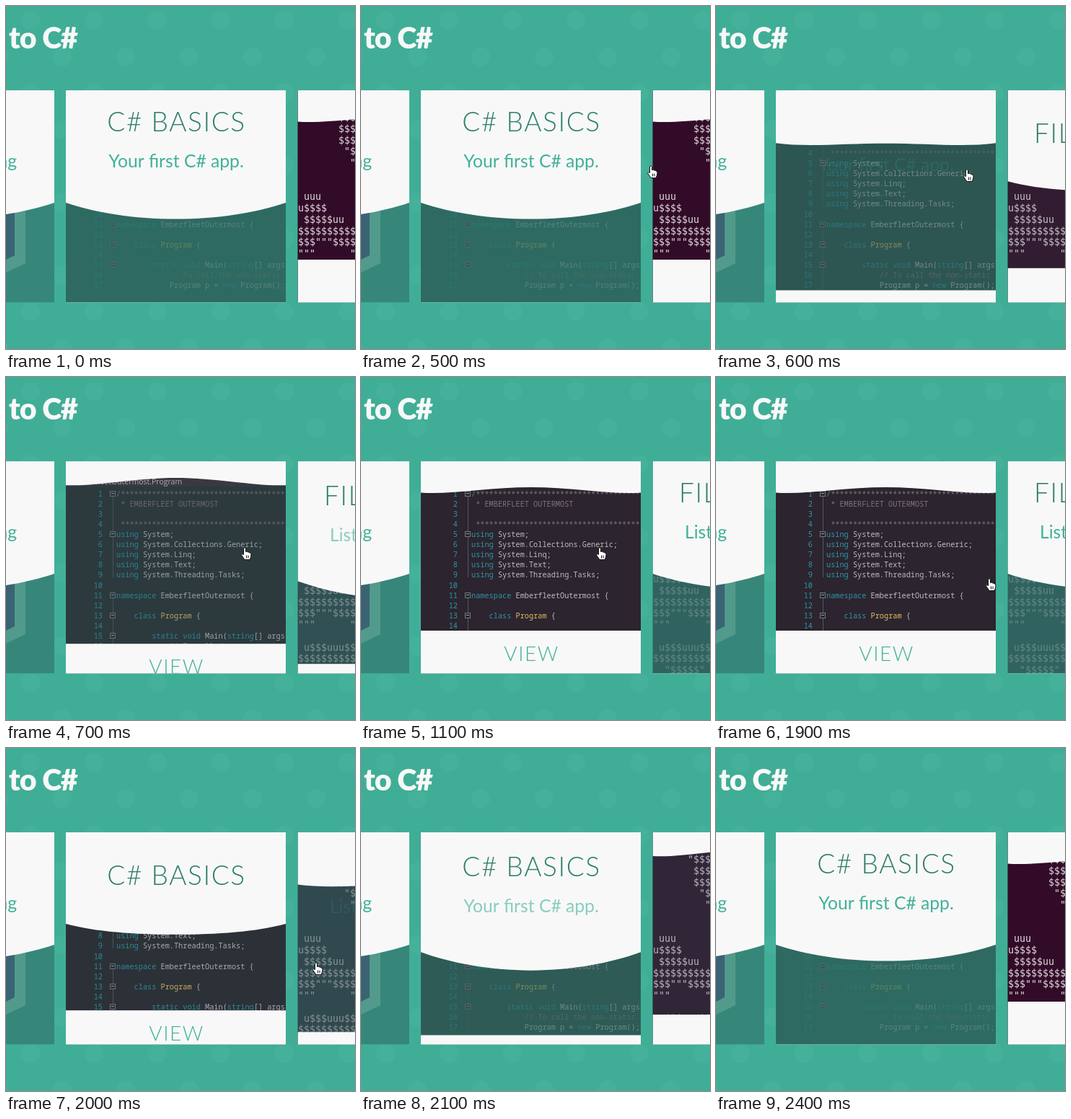
Animation of 484 by 476 pixels, one loop 2.5 s. Source, as an HTML page with a canvas:

```html
<!DOCTYPE html>
<html>
<head>
<meta charset="utf-8">
<style>
html, body { margin: 0; width: 100%; height: 100%; overflow: hidden; background: #40ae96; }
canvas { display: block; }
</style>
</head>
<body>
<canvas id="stage" width="484" height="476"></canvas>
<script>
const ctx = document.getElementById('stage').getContext('2d');
const LOOP = 2500, ENTER = 530, LEAVE = 1929;
const TOP = 117, W = 305, H = 294.5;
const WHITE = '#f8f8f8', TEAL = '#42b199', DEEP = '#2e7d6b', TINT = '#2f8a77';
const LATO = 'Lato, sans-serif';

const clamp = v => Math.max(0, Math.min(1, v));
const mix = (a, b, k) => a + (b - a) * k;
const smooth = k => k * k * (3 - 2 * k);
const backOut = k => { const m = k - 1; return m * m * (2.70158 * m + 1.70158) + 1; };

function text(str, x, y, font, color, align = 'left', spacing = 0) {
  ctx.font = font;
  ctx.fillStyle = color;
  ctx.textAlign = align;
  ctx.letterSpacing = spacing + 'px';
  ctx.fillText(str, x, y);
}

function rect(x, y, w, h, color) {
  ctx.fillStyle = color;
  ctx.fillRect(x, y, w, h);
}

function poly(points, color) {
  ctx.beginPath();
  points.forEach(p => ctx.lineTo(...p));
  ctx.fillStyle = color;
  ctx.fill();
}

function withAlpha(alpha, draw) {
  ctx.save();
  ctx.globalAlpha = alpha;
  draw();
  ctx.restore();
}

function clipCard(x) {
  ctx.beginPath();
  ctx.rect(x, TOP, W, H);
  ctx.clip();
}

function background() {
  rect(0, 0, 484, 476, '#40ae96');
  ctx.fillStyle = '#45b19a';
  for (let row = 0; row < 10; row++)
    for (let col = -1; col < 6; col++) {
      ctx.beginPath();
      ctx.arc(34 + 88 * col + 44 * (row % 2), 20 + 50.5 * row, 13, 0, 7);
      ctx.fill();
    }
  text('to C#', 4, 59, '900 41px ' + LATO, WHITE, 'left', -.9);
}

// Code lines: segments of [colour key, text]
const INK = { k: '#2b97a8', t: '#bdbdc2', c: '#7d747e', y: '#e0bf62' };
const CODE = [
  [['c', '/' + '*'.repeat(45)]],
  [['c', ' * EMBERFLEET OUTERMOST']],
  [],
  [['c', ' ' + '*'.repeat(45)]],
  ...['System', 'System.Collections.Generic', 'System.Linq', 'System.Text', 'System.Threading.Tasks']
    .map(name => [['k', 'using '], ['t', name + ';']]),
  [],
  [['k', 'namespace '], ['t', 'EmberfleetOutermost {']],
  [],
  [['k', '    class '], ['y', 'Program'], ['t', ' {']],
  [],
  [['k', '        static void '], ['t', 'Main('], ['k', 'string'], ['t', '[] args) {']],
  [['c', '            // To call the non-static']],
  [['t', '            Program p = '], ['k', 'new '], ['t', 'Program();']],
];

function editor() {
  const font = '10.25px "Noto Sans Mono", monospace';
  rect(83, TOP, W, H, '#2c242e');
  rect(83, TOP, W, 35, '#3c3a43');
  text('EmberfleetOutermost.Program', 92, 149, '10.5px "Open Sans", sans-serif', '#cfcfd2');
  rect(148, 162, 1, 116, '#4e5a60');
  rect(148, 303, 1, 110, '#4e5a60');
  CODE.forEach((line, i) => {
    const y = 162 + 14.06 * i;
    text(i + 1, 134, y + 4, font, INK.k, 'right');
    let col = 0;
    for (const [ink, part] of line) {
      text(part, 153 + col * 6.153, y + 4, font, INK[ink]);
      col += part.length;
    }
    if ([0, 4, 10, 12, 14].includes(i)) {
      const top = Math.round(y) - 4;
      rect(144, top, 8, 8, '#6c7d82');
      rect(145, top + 1, 6, 6, '#2c242e');
      rect(146, top + 3, 4, 1, '#9aa6aa');
    }
  });
}

const ASCII = [
  '      "$$$$', '       $$$$', '       $$$$', '        "$$', '         "$', '', '',
  ' uuu', 'u$$$$', ' $$$$$uu', '$$$$$$$$$$$', '$$$"""$$$$$', '"""      "$', '',
  ' u$$$uuu$$$', '$$$$$$$$$$$', '  "$$$$$"',
];

function terminal() {
  rect(404, TOP, W, H, '#320b28');
  ASCII.forEach((line, i) =>
    text(line, 405, 159.3 + 15.73 * i, '13.3px "DejaVu Sans Mono", monospace', '#e2dde0'));
}

// White panel whose lower edge morphs from a bulge to a ripple
function wave(x, k) {
  const sx = W / 180, sy = .911;
  const px = v => x + v * sx, py = v => TOP + v * sy;
  const edge = mix(171.14, 47.78, k);
  const near = edge + mix(15.47, 3.13, k);
  const mid = edge + mix(24.76, -8.2, k);
  ctx.beginPath();
  ctx.moveTo(x, TOP);
  ctx.lineTo(x, py(edge));
  ctx.bezierCurveTo(px(24.58), py(near), px(55.9), py(mid), px(90), py(mid));
  ctx.bezierCurveTo(px(124.1), py(mid), px(155.42), py(near), px(180), py(edge));
  ctx.lineTo(px(180), TOP);
  ctx.fillStyle = WHITE;
  ctx.fill();
}

function card(x, hover, since, picture, labels) {
  const turn = k => hover ? k : 1 - k;
  const step = clamp(since / 245);
  const slide = turn(hover ? step : smooth(step));
  const bottom = mix(TOP + H, 352, slide);
  ctx.save();
  clipCard(x);
  rect(x, TOP, W, H, TINT);
  withAlpha(mix(.3, 1, slide), picture);
  wave(x, turn(backOut(clamp(since / 330))));
  rect(x, bottom, W, 70, WHITE);
  text('VIEW', x + W / 2 + 1, bottom + 42, '300 28px ' + LATO, TEAL, 'center', 1.5);
  const titleAlpha = 1 - turn(clamp(since / 60));
  const noteAlpha = hover ? clamp(1 - since / 84) : clamp((since - 80) / 150);
  ctx.translate(0, 20 * slide);
  labels(titleAlpha, noteAlpha);
  ctx.restore();
}

const title = (str, x, align) => text(str, x, 174, '300 37px ' + LATO, DEEP, align, 1.6);
const note = (str, x, align) => text(str, x, 223.5, '24.7px ' + LATO, TEAL, align);

function basicsLabels(a, b) {
  withAlpha(a, () => title('C# BASICS', 236.5, 'center'));
  withAlpha(b, () => note('Your first C# app.', 236, 'center'));
}

function filesLabels(a, b) {
  withAlpha(a, () => title('FILES', 441));
  withAlpha(b, () => note('Listing them.', 449));
}

function shieldCard() {
  const x = -238;
  ctx.save();
  clipCard(x);
  rect(x, TOP, W, H, '#36877a');
  poly([[0, 270], [27, 270], [27, 357], [0, 370]], '#529a8b');
  poly([[0, 270], [12, 270], [12, 346], [0, 352]], '#3a6473');
  wave(x, 0);
  note('Getting going', 15, 'right');
  ctx.restore();
}

// Fingertip path: time, x, y
const PATH = [
  [400, 470, 232], [500, 402, 222], [600, 348, 227], [700, 331, 237], [1100, 331, 237],
  [1500, 367, 271], [1700, 379, 280], [1900, 379, 280], [2000, 430, 298],
];

function cursor(t) {
  const i = PATH.findIndex(p => p[0] >= t);
  if (i < 0 || t < PATH[0][0]) return;
  const b = PATH[i], a = PATH[Math.max(0, i - 1)];
  const k = i ? (t - a[0]) / (b[0] - a[0]) : 0;
  ctx.save();
  ctx.translate(mix(a[1], b[1], k), mix(a[2], b[2], k));
  ctx.beginPath();
  ctx.moveTo(-1.5, 9);
  ctx.lineTo(-1.5, 1);
  ctx.quadraticCurveTo(0, -1.5, 1.5, 1);
  ctx.lineTo(1.5, 5.5);
  ctx.quadraticCurveTo(3.5, 4.5, 4.5, 6);
  ctx.quadraticCurveTo(6.5, 5.5, 7, 7);
  ctx.quadraticCurveTo(9, 7, 9, 9);
  ctx.lineTo(8.5, 13);
  ctx.lineTo(7, 16.5);
  ctx.lineTo(0, 16.5);
  ctx.lineTo(-4.5, 10);
  ctx.quadraticCurveTo(-4, 7.5, -1.5, 9.5);
  ctx.closePath();
  ctx.fillStyle = '#fff';
  ctx.strokeStyle = '#111';
  ctx.lineWidth = 1;
  ctx.fill();
  ctx.stroke();
  for (const x of [2, 4.5]) rect(x, 10.5, 1, 4, '#111');
  ctx.restore();
}

function draw(t) {
  const over = t >= ENTER && t < LEAVE;
  const since = over ? t - ENTER : (t - LEAVE + LOOP) % LOOP;
  background();
  shieldCard();
  card(83, over, since, editor, basicsLabels);
  card(404.5, !over, since, terminal, filesLabels);
  cursor(t);
}

const start = performance.now();
function tick() {
  const t = (performance.now() - start) % LOOP;
  // The picture advances ten times a second
  draw(Math.floor((t + 4) / 100) * 100 % LOOP);
  requestAnimationFrame(tick);
}
tick();
</script>
</body>
</html>
```
